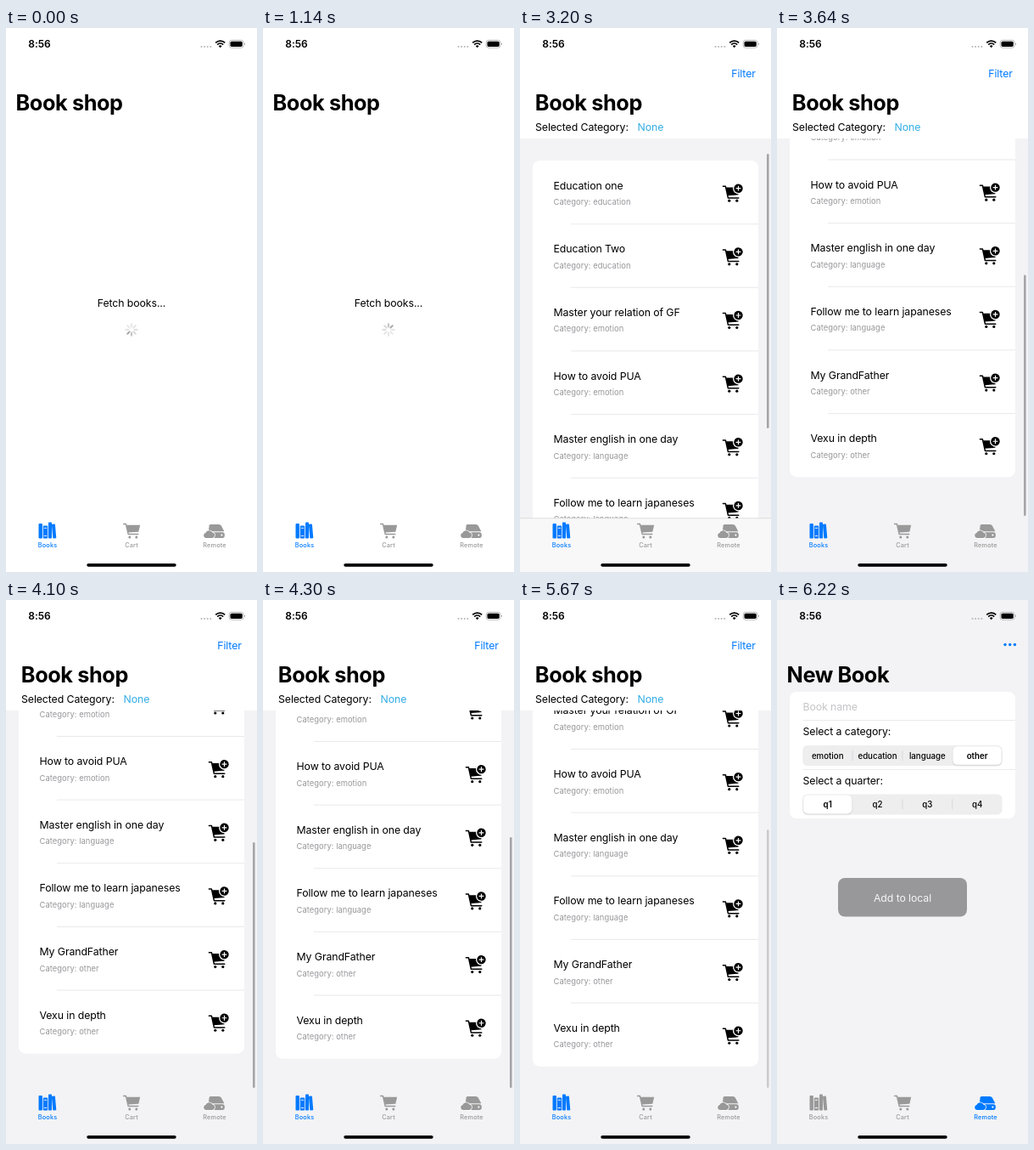
Animation of 296x640 px, one loop 8000 ms. Source, as an HTML page:

```html
<!DOCTYPE html>
<html lang="en">
<head>
<meta charset="utf-8">
<title>Book shop</title>
<style>
@property --s { syntax: "<number>"; inherits: true; initial-value: 0; }
html, body { margin: 0; width: 100%; height: 100%; overflow: hidden; background: #fff; }
svg { display: block; width: 100%; height: 100%; }
text { font: 12.35px Inter, "Open Sans", sans-serif; letter-spacing: -.009em; }
.h1 { font-size: 25.3px; font-weight: 700; letter-spacing: -.016em; }
.sub { font-size: 9.4px; letter-spacing: .005em; fill: #98989c; }
.tab { font-size: 7.3px; font-weight: 500; letter-spacing: .025em; fill: currentColor; }
.seg { font-size: 9.7px; font-weight: 500; letter-spacing: 0; }
.on { font-weight: 600; }
.mid { text-anchor: middle; }
.link { fill: #007aff; }

/* every change is a hard cut */
.load, .list, .form, .spin, .bar, .tabbg, .books, .remote {
  animation: 8s step-end infinite;
}
.load { animation-name: load; }
.list { animation-name: list, scroll; }
.form { animation-name: form; }
.tabbg { animation-name: tabbg; }
.bar { animation-name: bar; }
.books { animation-name: books; }
.remote { animation-name: remote; }
.spin { animation-name: spin; transform-origin: 148px 355px; }
.rows { transform: translateY(calc(var(--s) * -1px)); }
.bar {
  --in: min(var(--s), 204.5);
  --over: max(var(--s) - 204.5, 0);
  y: calc((148 + var(--in) * .5966 + var(--over)) * 1px);
  height: calc((323 - var(--in) * .0929 - var(--over)) * 1px);
}
@keyframes load { 0% { visibility: visible } 37.37%, 100% { visibility: hidden } }
@keyframes list {
  0% { visibility: hidden } 37.37% { visibility: visible } 77.74%, 100% { visibility: hidden }
}
@keyframes form { 0% { visibility: hidden } 77.74%, 100% { visibility: visible } }
@keyframes tabbg { 0% { opacity: 0 } 37.37% { opacity: 1 } 45.49%, 100% { opacity: 0 } }
@keyframes bar { 0% { opacity: 1 } 70.87% { opacity: .5 } 72.24%, 100% { opacity: 0 } }
@keyframes books { 0% { color: #007aff } 77.74%, 100% { color: #999 } }
@keyframes remote { 0% { color: #999 } 77.74%, 100% { color: #007aff } }
@keyframes spin {
  0% { transform: rotate(225deg) }
  1.49% { transform: rotate(270deg) }
  2.74% { transform: rotate(315deg) }
  3.99% { transform: rotate(360deg) }
  5.24% { transform: rotate(405deg) }
  6.49% { transform: rotate(450deg) }
  7.74% { transform: rotate(495deg) }
  8.99% { transform: rotate(540deg) }
  10.24% { transform: rotate(585deg) }
  11.49% { transform: rotate(630deg) }
  12.74% { transform: rotate(675deg) }
  14.24%, 100% { transform: rotate(765deg) }
}
@keyframes scroll {
  0% { --s: 0 }
  42.36% { --s: 70 }
  43.74% { --s: 170 }
  45.49% { --s: 225 }
  46.86% { --s: 227 }
  49.74% { --s: 223 }
  51.24% { --s: 219.5 }
  52.49% { --s: 213.5 }
  53.86% { --s: 208.5 }
  55.11% { --s: 206 }
  56.49%, 100% { --s: 204.5 }
}
</style>
</head>
<body>
<svg viewBox="0 0 296 640">
  <defs>
    <clipPath id="view"><rect y="130" width="296" height="510"/></clipPath>
    <filter id="lift" x="-10%" y="-20%" width="120%" height="150%">
      <feDropShadow dx="0" dy="1" stdDeviation="1.2" flood-opacity=".16"/>
    </filter>
    <g id="add">
      <path d="M239.4 186.3h3l3 13.6h12.4" fill="none" stroke="#000" stroke-width="1.5" stroke-linecap="round" stroke-linejoin="round"/>
      <path d="M243 187.6h15.8l-1.4 8.7-12.4 1z"/>
      <circle cx="246.8" cy="203.2" r="1.6"/>
      <circle cx="255.8" cy="203.2" r="1.6"/>
      <circle cx="257.5" cy="188.7" r="6.5" fill="#fff"/>
      <circle cx="257.5" cy="188.7" r="5.2"/>
      <path d="M254.6 188.7h5.8M257.5 185.8v5.8" stroke="#fff" stroke-width="1.2"/>
    </g>
  </defs>

  <rect width="296" height="640" fill="#fff"/>

  <g class="load">
    <text class="h1" x="11.5" y="96.7">Book shop</text>
    <text class="mid" x="148" y="327.8">Fetch books...</text>
    <g class="spin" id="spokes" stroke="#6c6c70" stroke-width="1.7" stroke-linecap="round"></g>
  </g>

  <g class="list">
    <rect y="130" width="296" height="510" fill="#f3f3f5"/>
    <g clip-path="url(#view)"><g class="rows" id="rows">
      <rect x="15" y="156" width="266" height="597.2" rx="8" fill="#fff"/>
    </g></g>
    <rect class="bar" x="291" width="2.6" rx="1.3" fill="#a5a5a9"/>
    <text class="h1" x="17.8" y="96.7">Book shop</text>
    <text class="link" x="277.8" y="57.5" text-anchor="end">Filter</text>
    <text x="18" y="121.2">Selected Category:</text>
    <text x="138.5" y="121.2" fill="#32ade6">None</text>
    <g class="tabbg">
      <rect y="577" width="296" height="63" fill="#f8f8f9"/>
      <rect y="576.5" width="296" height=".7" fill="#cfcfd2"/>
    </g>
  </g>

  <g class="form">
    <rect width="296" height="640" fill="#f3f3f5"/>
    <text class="h1" x="11.5" y="96.7">New Book</text>
    <g class="link">
      <circle cx="269" cy="52.5" r="1.7"/><circle cx="274.7" cy="52.5" r="1.7"/><circle cx="280.4" cy="52.5" r="1.7"/>
    </g>
    <rect x="15" y="108" width="266" height="149" rx="8" fill="#fff"/>
    <path d="M30.5 141.5H281M30.5 199.5H281" stroke="#e3e3e6" stroke-width=".7"/>
    <text x="30.5" y="130.2" fill="#c5c5c8">Book name</text>
    <text x="30.5" y="159.2">Select a category:</text>
    <text x="30.5" y="216.6">Select a quarter:</text>
    <g id="segs"></g>
    <rect x="72" y="327" width="152" height="45.5" rx="8" fill="#98989a"/>
    <text class="mid" x="148" y="354.6" fill="#f5f5f6">Add to local</text>
  </g>

  <g class="books" fill="currentColor">
    <rect x="38.5" y="583" width="4.4" height="17.5" rx=".9"/>
    <rect x="43.8" y="585.5" width="5.4" height="15" rx=".9"/>
    <path d="M44.8 588.3h3.4M44.8 597.5h3.4" stroke="#fff" stroke-width=".9"/>
    <rect x="50" y="581.5" width="4" height="19" rx=".9"/>
    <rect x="54.6" y="583.5" width="4" height="17" rx=".9" transform="rotate(-5 56.6 592)"/>
    <text class="tab mid" x="49" y="611">Books</text>
  </g>
  <g color="#999" fill="currentColor">
    <path d="M138.6 583.5h2.8l2.8 12h11.6" fill="none" stroke="currentColor" stroke-width="1.4" stroke-linecap="round" stroke-linejoin="round"/>
    <path d="M142 584.8h16.2l-1.9 7.9-12.4.9z"/>
    <circle cx="145.8" cy="599" r="1.5"/>
    <circle cx="153.8" cy="599" r="1.5"/>
    <text class="tab mid" x="148" y="611">Cart</text>
  </g>
  <g class="remote" fill="currentColor">
    <path d="M241.4 584h9.8q1.7 0 2.6 1.5l3.6 6.8h-18.7l1-7q.3-1.3 1.7-1.3z"/>
    <rect x="239" y="593.3" width="18.8" height="6.6" rx="2.6"/>
    <circle cx="254.4" cy="596.6" r="1.1" fill="#fff"/>
    <path d="M235.8 600a3 3 0 0 1-.4-5.9 4.4 4.4 0 0 1 8-.6 3.3 3.3 0 0 1-.2 6.5z" stroke="#fff" stroke-width="1.5" paint-order="stroke"/>
    <text class="tab mid" x="246" y="611">Remote</text>
  </g>

  <text x="26.3" y="23.1" style="font-size:12px;font-weight:600;letter-spacing:-.005em">8:56</text>
  <path d="M230.5 22h12" stroke="#b8b8ba" stroke-width="2.1" stroke-linecap="round" stroke-dasharray="0 3.6"/>
  <g fill="none" stroke="#000" stroke-width="1.7">
    <path d="M247.2 17.4a7.8 7.8 0 0 1 11 0M249.2 19.6a5 5 0 0 1 7 0"/>
    <path d="M252.7 23.2l-1.9-2a2.8 2.8 0 0 1 3.8 0z" fill="#000" stroke="none"/>
  </g>
  <rect x="263.2" y="14.4" width="16.8" height="8.8" rx="2.7" fill="none" stroke="#a8a8aa" stroke-width=".8"/>
  <rect x="264.5" y="15.7" width="14.2" height="6.2" rx="1.6"/>
  <path d="M281 17.4q1.1.5 1.1 1.4t-1.1 1.4z" fill="#a8a8aa"/>
  <rect x="95.3" y="629.9" width="105.4" height="3.9" rx="1.95"/>
</svg>
<script>
const put = (id, html) => document.getElementById(id).insertAdjacentHTML("beforeend", html);

const fade = [.72, .52, .36, .28, .22, .22, .22, .22];
put("spokes", fade.map((o, i) =>
  `<path d="M148 351.6v-3.5" opacity="${o}" transform="rotate(${-45 * i} 148 355)"/>`).join(""));

const books = [
  ["Education one", "education"], ["Education Two", "education"],
  ["Master your relation of GF", "emotion"], ["How to avoid PUA", "emotion"],
  ["Master english in one day", "language"], ["Follow me to learn japaneses", "language"],
  ["My GrandFather", "other"], ["Vexu in depth", "other"]
];
put("rows", books.map(([name, kind], i) => `<g transform="translate(0 ${i * 74.65})">
  ${i ? '<path d="M60 156H281" stroke="#e0e0e3" stroke-width=".7"/>' : ""}
  <text x="39.5" y="189.7">${name}</text>
  <text class="sub" x="39.5" y="208.2">Category: ${kind}</text>
  <use href="#add"/></g>`).join(""));

function segment(y, labels, on) {
  const w = 58.8, left = 30.3;
  let out = `<rect x="${left}" y="${y}" width="235.2" height="24" rx="5.5" fill="#eeeeef"/>`;
  labels.forEach((label, i) => {
    const x = left + i * w;
    if (i && i !== on && i - 1 !== on)
      out += `<path d="M${x} ${y + 6}v12" stroke="#d4d4d7" stroke-width=".8"/>`;
    if (i === on)
      out += `<rect x="${x + 1}" y="${y + 1.2}" width="${w - 2}" height="21.6" rx="5" fill="#fff" filter="url(#lift)"/>`;
    out += `<text class="seg mid ${i === on ? "on" : ""}" x="${x + w / 2}" y="${y + 15.6}">${label}</text>`;
  });
  return out;
}
put("segs", segment(171, ["emotion", "education", "language", "other"], 3)
  + segment(228.4, ["q1", "q2", "q3", "q4"], 0));
</script>
</body>
</html>
```
